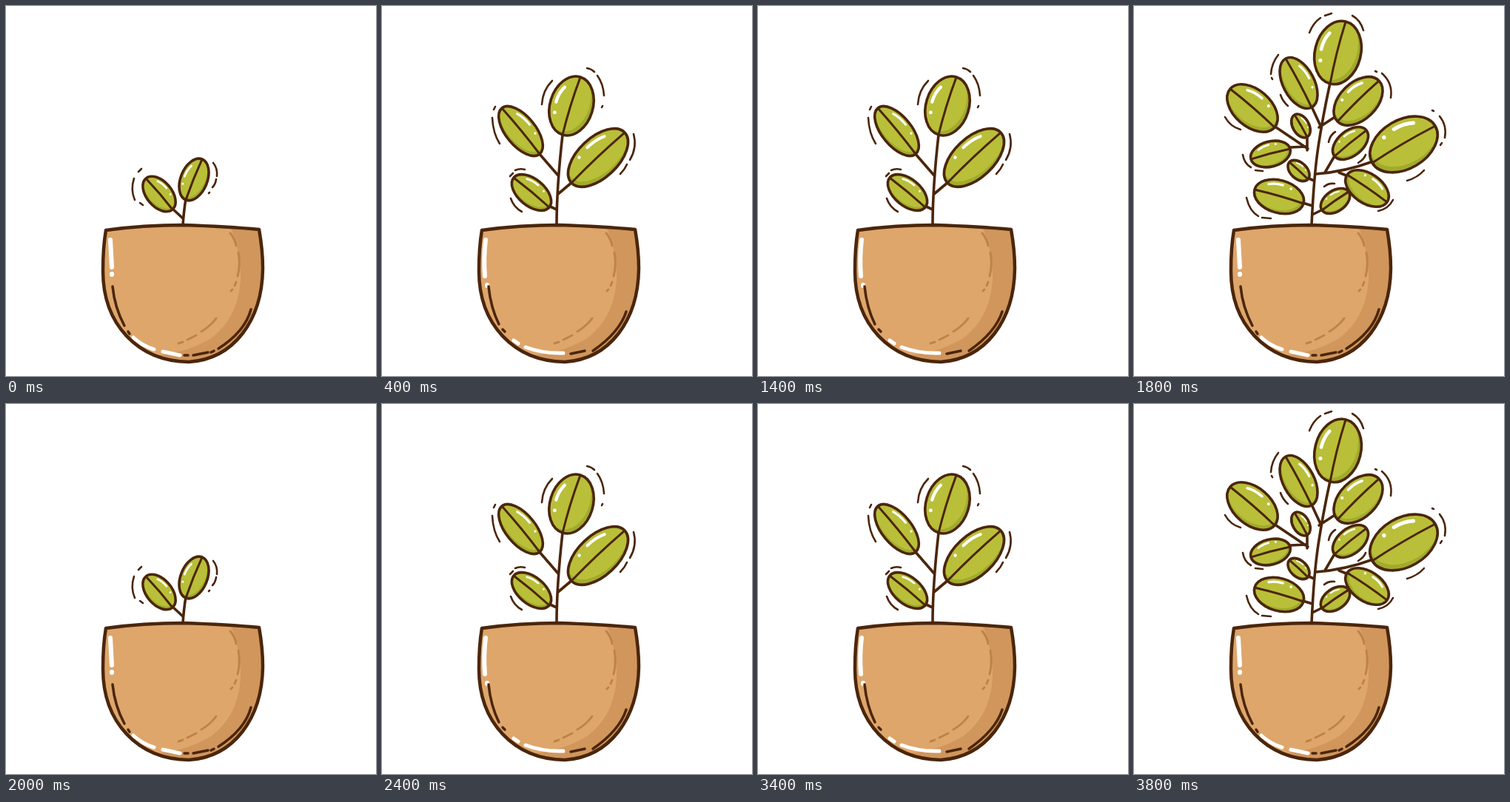
Recreate the animation shown at these times as an HTML page with a canvas. Size 500 px wide and 500 px high, loop 4000 ms.

```html
<!DOCTYPE html>
<html lang="en">
<head>
<meta charset="utf-8">
<title>Growing plant</title>
<style>
  html, body { margin: 0; width: 100%; height: 100%; overflow: hidden; background: #fff; }
  canvas { display: block; }
</style>
</head>
<body>
<canvas id="stage" width="500" height="500"></canvas>
<script>
const ctx = document.getElementById('stage').getContext('2d');
const INK = '#4b260c', LIGHT = '#b9bf38', DARK = '#a1ab2b';
const CLAY = '#dea66b', CLAY_SHADE = '#d0965c', CLAY_LINE = '#bf8349';
const STEP = 200;

// leaves: [base x, base y, tip x, tip y, half width]
const stages = [
  {
    pot: 0,
    leaves: [[225, 275, 189, 233, 17], [243, 262, 265, 207, 18]],
    stems: 'M239 296 Q240 280 243 260 M239 287 L224 273',
    marks: 'M173 233 Q168 248 174 262 M179 224 L183 220 M181 266 L185 269 M280 212 Q286 219 285 230 M284 234 Q283 241 279 245 M274 253 L275 252'
  },
  {
    pot: 1,
    leaves: [[218, 238, 176, 186, 19], [243, 218, 264, 146, 24], [254, 264, 299, 217, 19]],
    stems: 'M237 296 Q238 250 243 216 M238 262 L217 237 M238 277 L255 264',
    marks: 'M164 187 Q161 207 171 225 M169 178 L173 175 M232 150 Q222 162 221 178 M274 131 Q288 138 290 160 M309 216 Q314 230 306 246 M300 254 L295 259'
  },
  {
    pot: 1,
    leaves: [[244, 174, 268, 96, 29], [213, 200, 162, 138, 20], [256, 239, 328, 171, 27], [226, 272, 178, 232, 18]],
    stems: 'M236 296 Q236 245 244 174 M238 229 L212 199 M238 254 L257 238 M236 275 L225 270',
    marks: 'M230 101 Q217 114 216 133 M277 84 Q283 85 287 89 M291 94 Q299 105 300 121 M298 135 L297 137 M153 136 L151 140 M149 151 Q150 172 159 186 M340 173 Q345 191 335 208 M331 214 Q328 221 322 227 M173 230 L177 226 M180 222 Q186 219 193 221 M174 260 Q178 272 189 278'
  },
  {
    pot: 0,
    leaves: [
      [255, 120, 278, 38, 30], [227, 156, 189, 92, 22], [268, 168, 327, 110, 25], [180, 190, 121, 145, 23],
      [302, 224, 377, 172, 30], [211, 220, 159, 202, 17], [226, 269, 164, 245, 21], [261, 267, 318, 234, 19]
    ],
    stems: 'M239 296 Q241 210 255 118 M248 184 L226 155 M246 188 L269 167 M239 232 L179 189 M242 242 Q270 236 303 223 M238 231 L210 219 M239 275 L225 268 M240 281 L262 267',
    marks: 'M238 55 Q242 38 254 31 M287 28 Q300 34 304 49 M178 97 Q175 112 182 126 M335 105 Q345 117 341 136 M111 144 Q108 160 124 175 M382 161 Q393 173 387 190 M352 222 Q365 218 374 208 M148 209 Q151 220 162 224 M152 249 Q156 269 172 276 M325 245 Q322 256 310 264'
  },
  {
    pot: 0,
    leaves: [
      [265, 105, 286, 21, 31], [240, 137, 205, 71, 21], [275, 156, 331, 101, 25], [190, 164, 130, 112, 25],
      [234, 177, 217, 147, 11], [322, 212, 407, 162, 33], [271, 203, 314, 168, 17], [211, 193, 158, 207, 17],
      [235, 234, 210, 211, 11], [288, 228, 342, 265, 20], [229, 267, 163, 248, 22], [254, 276, 290, 251, 14]
    ],
    stems: 'M240 296 Q243 230 249 190 Q255 150 265 104 M253 164 L240 136 M250 164 L276 147 M235 193 L189 162 M234 195 L234 176 M232 190 L211 191 M246 227 Q285 224 323 210 M258 225 L272 201 M243 236 L234 232 M277 225 L289 230 M241 270 L228 266 M241 282 L255 275',
    marks: 'M237 36 Q242 23 252 16 M258 13 L267 10 M295 13 Q306 19 310 33 M195 66 Q186 77 185 92 M186 97 L187 99 M198 120 Q201 129 208 135 M326 88 L328 89 M335 91 Q350 104 347 124 M123 150 Q130 163 144 167 M403 141 L405 142 M413 149 Q423 161 420 178 M416 185 L414 188 M369 236 Q383 232 392 222 M263 184 Q265 174 272 170 M147 201 Q149 213 158 218 M164 222 L174 223 M303 212 Q311 207 313 201 M350 262 Q344 274 330 277 M152 259 Q156 277 168 284 M173 286 L185 287 M257 244 Q263 239 271 240'
  }
];

// Glints and inner contour strokes of the two hand-drawn pot versions
const pots = [
  {
    glint: 'M141 316 L143 353 M143 362 L143 363',
    white: 'M172 448 Q184 459 200 464 M212 467 L235 472',
    ink: 'M144 379 Q147 408 160 432 M165 440 L167 443 M331 410 Q323 440 287 463 M281 466 L277 468 M273 468 L253 472 M246 472 L241 472'
  },
  {
    glint: 'M140 316 Q137 340 139 365 M142 377 L142 378',
    white: 'M178 452 L184 456 M194 461 Q218 470 245 469',
    ink: 'M144 379 Q147 408 158 430 M163 437 L166 440 M330 413 Q321 441 285 466 M274 466 L255 470'
  }
];

const potShape = new Path2D('M135 303 Q185 296 240 296 Q300 298 342 302 Q347 330 347 355 C346 425 308 477 247 481 C178 480 131 430 131 358 Q131 326 135 303 Z');
const potShade = new Path2D('M303 298 C326 350 324 420 272 452 Q240 470 190 474 L250 490 L360 450 L355 295 Z');

function stroke(path, color, width) {
  ctx.strokeStyle = color;
  ctx.lineWidth = width;
  ctx.stroke(typeof path === 'string' ? new Path2D(path) : path);
}

function drawPot({ glint, white, ink }) {
  ctx.fillStyle = CLAY;
  ctx.fill(potShape);
  ctx.save();
  ctx.clip(potShape);
  ctx.fillStyle = CLAY_SHADE;
  ctx.fill(potShade);
  ctx.restore();
  stroke('M303 307 Q309 314 311 324 M314 333 Q317 349 313 365 M311 373 L309 378 M306 383 L304 385 M284 422 Q277 432 264 440 M257 445 L245 451 M239 454 L233 456', CLAY_LINE, 3);
  stroke(glint, '#fff', 6);
  stroke(white, '#fff', 5);
  stroke(ink, INK, 3.5);
  stroke(potShape, INK, 4.5);
}

function drawLeaf([bx, by, tx, ty, w]) {
  const dx = tx - bx, dy = ty - by, a = Math.hypot(dx, dy) / 2;
  const oval = new Path2D(), glint = new Path2D();
  oval.ellipse(0, 0, a, w, 0, 0, 7);
  glint.ellipse(0, 0, a * .8, w * .74, 0, -1.6, -.85);
  ctx.save();
  ctx.translate((bx + tx) / 2, (by + ty) / 2);
  ctx.rotate(Math.atan2(dy, dx));
  ctx.scale(1, dx > 0 ? 1 : -1); // keep the lit side on top
  ctx.save();
  ctx.clip(oval);
  ctx.fillStyle = DARK;
  ctx.fill(oval);
  ctx.fillStyle = LIGHT;
  ctx.beginPath();
  ctx.ellipse(a * .1, -w * .18, a, w, 0, 0, 7);
  ctx.fill();
  ctx.restore();
  const size = Math.max(2, w * .15);
  stroke(glint, '#fff', size);
  ctx.fillStyle = '#fff';
  ctx.beginPath();
  ctx.arc(a * .8 * Math.cos(-2.05), w * .74 * Math.sin(-2.05), size * .55, 0, 7);
  ctx.fill();
  stroke(`M${-a} 0 Q0 ${-w * .08} ${a * .95} 0`, INK, 3);
  stroke(oval, INK, 3.6);
  ctx.restore();
}

const start = performance.now();
function draw(now) {
  const step = Math.floor(Math.max(0, now - start) / STEP) % stages.length;
  const { pot, leaves, stems, marks } = stages[step];
  ctx.fillStyle = '#fff';
  ctx.fillRect(0, 0, 500, 500);
  ctx.lineCap = ctx.lineJoin = 'round';
  stroke(stems, INK, 3.6);
  leaves.forEach(drawLeaf);
  stroke(marks, INK, 2.6);
  drawPot(pots[pot]);
  requestAnimationFrame(draw);
}
draw(start);
</script>
</body>
</html>
```
